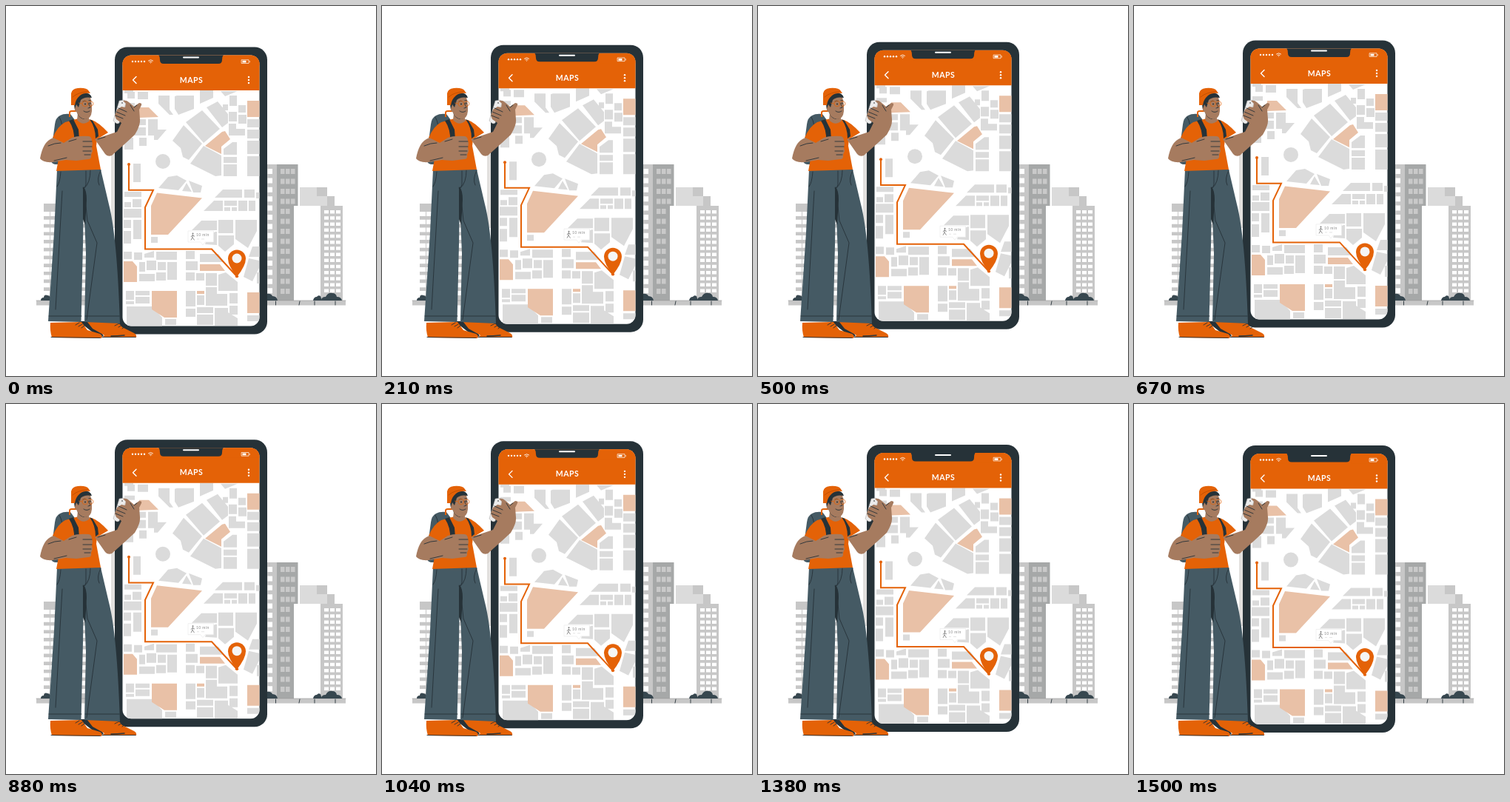
Write an HTML page that moves like this. It is 500x500 px and loops after 1.54 s.

```html
<!DOCTYPE html>
<html lang="en">
<head>
<meta charset="utf-8">
<title>Maps</title>
<style>
  html, body { margin: 0; width: 100%; height: 100%; overflow: hidden; background: #fff; }
  svg { display: block; width: 100%; height: 100%; }
  .dark { fill: #263238; }
  .slate { fill: #455a64; }
  .orange { fill: #e46207; }
  .skin { fill: #a67b5f; }
  .grey { fill: #c7c7c7; }
  .pale { fill: #dbdbdb; }
  .peach { fill: #e9c1a7; }
  .white { fill: #fff; }
  .line { fill: none; stroke: #263238; stroke-width: .9; stroke-linecap: round; stroke-linejoin: round; }
  .route { fill: none; stroke: #e46207; stroke-width: 2; }
  .icon { fill: none; stroke: #fff; stroke-width: 1.4; stroke-linecap: round; stroke-linejoin: round; }
</style>
</head>
<body>
<svg viewBox="0 0 500 500">
  <defs>
    <clipPath id="screen"><rect x="157.500" y="66.500" width="185" height="366" rx="12"/></clipPath>
  </defs>

  <g id="city">
    <path fill="#e2e0de" d="M142 200h6v100h-6z"/>
    <path class="grey" d="M51 267h66v131H51zM353 214h14v184h-14z"/>
    <path fill="#a6a8a8" d="M366 214h28.500v56H389v128h-23z"/>
    <path class="pale" d="M397 245h23v12h14v13h-37z"/>
    <path class="grey" d="M420 245h14v12h10v13h-10v-13h-14zM425 270h30v128h-30z"/>
    <g id="windows"></g>
    <path class="grey" d="M41 398h418v6.500H41z"/>
    <path class="line" d="M41 398h418" style="stroke:#999;stroke-width:.6"/>
    <path class="line" d="M84 399v5M364.500 399v5M397 399l-1 5M417 399v5M445 399v5"/>
    <path fill="#37474f" d="M47 398q0-4 4-4q1-5 5-3q5 1 5 7zM352 398v-9q6-1 8 3q6 0 7 6zM415 398q1-5 5-5q2-3 5-1l2 6z"/>
    <path fill="#37474f" d="M426 398q0-5 6-5q3-6 9-5q5 0 6 5q6 0 7 5z"/>
  </g>

  <g id="phone">
    <rect class="dark" x="147" y="55.500" width="206" height="388" rx="17"/>
    <g clip-path="url(#screen)">
      <path class="white" d="M157 66h186v367H157z"/>
      <g class="pale">
        <!-- upper left -->
        <path d="M164 116h10v9h-10zM178 116h14v10h-14zM160 114h12v4h-12zM206 121h15v19l5 7h-5l-15-15zM228 122l3-1h23v18l-21 8-5-8zM262 114h18v10l-18 8zM160 131h14v6h-14zM172 153h17v8h-17zM192 153h13v14h12l-12 14h-5v-6h-8zM174 164h15v11h-15zM180 178h10v11h-10zM160 178h12v16h-12zM172 213h10v25h-10z"/>
        <!-- centre -->
        <circle cx="212" cy="210" r="10"/>
        <path d="M240 161l25 25-18 22-8-4-3-12-11-10zM243 157l22-16 24 25-22 19zM271 137l15-8 14 17v12l-8 6zM267 189l24 13v27l-8 1-34-17zM206 246l13-15 12-2 13 7-11 13zM247 236l18 7-2 9h-10zM244 239l7 12-13-1z"/>
        <!-- upper right -->
        <path d="M290 115h23l-17 7zM302 121h10v14h-10zM293 133h7v8h-7zM301 143h11v13h-11zM314 147h11v12h-11zM301 159h10v7h12v9h-22zM314 134h10v10h-10zM326 153h17v11h-17zM326 167h17v12h-17zM326 182h17v18h-17zM306 184h6v17h-18v-8zM294 204h18v8h-18zM294 214h18v16h-18zM326 203h17v27h-17z"/>
        <!-- left edge -->
        <path d="M160 251h23v7h-23zM160 265h9v7h-9zM171 261h12v11h-12zM159 274h24v12h-24zM172 289h11v26h-11zM159 289h10v11h-10zM159 304h10v17h-10zM196 312h9v8h-9z"/>
        <!-- right middle -->
        <path d="M293 248h26v11h-37zM322 248h14v11h-14zM338 252h5v8h-5zM281 263h12v14h-26zM295 263h17v7h-17zM314 263h12v14h-12zM328 263h9v14h-9zM295 272h8v5h-8zM305 272h7v5h-7zM264 290h21v13h-34zM287 289h20v18h-20zM310 289h29v15l-12 23-17-12zM283 305h2v18l-16-1 4-12zM287 310h21v12l-12 10-9-8zM333 325h10v14h-15z"/>
        <!-- lower left -->
        <path d="M159 332h11v10h-11zM173 333h11v10h-11zM187 335l13-4v9h-13zM203 332h28v11h-28zM180 346h8v13h-8zM190 344h13v13h-13zM205 346h11v11h-11zM218 346h13v24h-13zM180 362h21v10h-21zM203 360h13v11h-13zM162 385h11v12h-11zM175 385h19v6h-19zM175 393h19v9h-19zM162 399h11v4h-11zM163 406h34l14 15v12h-48zM215 423h15v8h-15z"/>
        <!-- lower right -->
        <path d="M243 331h12v11h-12zM243 345h16v12h-16zM243 360h12v11h-12zM257 361h11v10h-11zM262 335h25l8 11h-33zM270 361h15v17h-15zM287 363l10-3 16 13v12h-26zM270 380h15v9h14v16h-29zM302 388h11v14h-11zM243 385h13v21h-13zM258 391h10v13h-10zM243 409h13v11h-13zM258 407h22v8h-22zM258 417h22v14h-22zM282 408h18v6l13 8v10h-31zM302 405h11v12h-11zM328 341l14 3v10l-9 18-12-6zM339 360h4v15h-4zM326 418h17v8h-17z"/>
      </g>
      <path class="peach" d="M180 137h13l13 13-26 1zM326 128h17v22h-17zM269 189l23-19 4-1 7 11-12 10v10zM204 252.500l61 7-46 49.500h-23v-39zM159 345h12l6 7v21h-18zM262 349h27l7 9h-34zM197 385h34v36h-17l-17-11zM326 387h17v28h-17zM258 385h10v4h-10z"/>

      <path class="route" d="M166 214v34.700h33l-11 23.300v56.500h90l34 37"/>
      <circle class="orange" cx="166" cy="214" r="2"/>
      <path d="M246 304h34.500v15H269l-3 4-3-4h-17z" fill="#fff" stroke="#e7e7e7" stroke-width=".6"/>
      <circle cx="252.500" cy="307.500" r="1" fill="#777"/>
      <path d="M252.500 309l-.5 3.500-2 4m2-4l2.500 4m-4.500-4.500l2-2.500 3 2" fill="none" stroke="#777" stroke-width=".8"/>
      <text x="257" y="311" font-family="Lato, sans-serif" font-size="5" letter-spacing=".4" fill="#888">10 min</text>
      <path d="M258 315h3m3 0h4" stroke="#ddd" stroke-width=".8"/>
      <ellipse class="orange" cx="312" cy="365.500" rx="2.200" ry="1.800"/>
      <path class="orange" d="M312 366q-12-15-12-24.500a12 12 0 0 1 24 0q0 9.500-12 24.500z"/>
      <circle cx="312" cy="341" r="6.500" fill="#f5f5f5"/>

      <path class="orange" d="M157 66h186v48H157z"/>
      <path class="dark" d="M157 65h48q3 2 3 8 0 5 5 5h74q5 0 5-5 0-6 3-8h48v-5H157z"/>
      <path class="orange" d="M157 80V78q0-11 11-11.500h35q3 1 3.500 5L207 80zM343 80V78q0-11-11-11.500h-35q-3 1-3.500 5L293 80z"/>
      <g class="white">
        <g id="signal"></g>
        <circle cx="328" cy="96" r="1.200"/><circle cx="328" cy="100" r="1.200"/><circle cx="328" cy="104" r="1.200"/>
        <path d="M319.500 73.800h5v2.700h-5z"/>
        <text x="250.500" y="103.600" text-anchor="middle" font-family="Lato, sans-serif" font-weight="700" font-size="10.500" letter-spacing=".5">MAPS</text>
      </g>
      <g class="icon">
        <path d="M176 95.500l-4.500 4.500 4.500 4.500"/>
        <path d="M192.500 74q3-2.500 6 0M194 75.600q1.500-1.200 3 0M195.500 77v.1" style="stroke-width:.9"/>
        <path d="M318.500 72.800h9.500v4.700h-9.500zM329.300 74.500v1.500" style="stroke-width:.7"/>
      </g>
    </g>
    <path class="icon" d="M240 69.500h20" style="stroke-width:2"/>
  </g>

  <g id="walker">
    <path class="slate" d="M73 148q5-3 14-2l9 12-8 56-22 0q-6-1-6-9l6-45q1-9 7-12z"/>
    <path class="line" d="M72 150q6 10 3 24M64 186l-3 22"/>
    <path d="M86 150v-6q0-2 3-2h7" fill="none" stroke="#e46207" stroke-width="2"/>

    <path class="dark" d="M98 426h22l12 20-6 2z"/>
    <path class="orange" d="M60 428q-1 10 2 20l67 1q2-4-2-6l-17-5-8-11zM110 427l7 9 16 9-3 3h46q1-4-3-6l-16-8-6-7z"/>
    <path class="line" d="M61 447.500l66 1M130 447.500h45M94 431l5-3M98 433l5-3M102 435l4-3M147 432l6-3M152 434l5-3M157 436l4-3"/>
    <path class="line" d="M142 446q8 0 18-1" style="stroke-width:1.400"/>
    <path class="slate" d="M69 221h59l11 47q11 42 15 161l-48-2 2-92-3-73-1 60-2.500 105-44.500-1 8-120z"/>
    <path class="line" d="M106 250l4 40 13 30-14 104M108 223v18q-1 5-4 5M114 222q0 17-8 24M74 224q-1 15-5 20M128 222q-6 12-2 20M76 250l-9 160M58 419h44M107 419h46"/>
    <path class="dark" d="M104 244q5 4 5 18l-2 34-3-8z"/>

    <path class="orange" d="M80 157l18-5 18 2q9 3 22 17l-15 9-1 9 6 32-60 2 7-38-12-7q7-16 17-21z"/>
    <path class="skin" d="M97 145l-1 9q8 9 17 1l-3-10z"/>
    <path class="dark" d="M96 144l15 7q-2 2-6 2-7-2-9-9z"/>
    <path class="skin" d="M93 123h21l2 10v9q-1 11-9 11-8-1-11-9-5-3-3-10z"/>
    <path class="dark" d="M91 127q4-10 14-10 9 0 11 7-10-2-15 3l-3 10-3-4-2 6z"/>
    <path class="orange" d="M88 134v-16q1-6 9-7 12-1 15 4l2 3q-9-1-14 3-6 5-7 13z"/>
    <path class="line" d="M90 123q8-7 21-7" style="stroke:#c04f00"/>
    <path class="line" d="M104 129q2-1.500 4-.5M112 127.500l3 .5M111 131l3 6-3 1M105 142q4 3 8 0"/>
    <circle class="dark" cx="107" cy="132.500" r="1"/><circle class="dark" cx="113.500" cy="131.500" r="1"/>
    <path d="M103 132a3.800 3.800 0 1 0 7.600 0a3.800 3.800 0 1 0-7.600 0M111.500 130a3.500 3.500 0 1 1 1 5M103 132l-5-1" fill="none" stroke="#e46207" stroke-width=".7"/>
    <path class="dark" d="M85 155l6-2 7 14 1 14-7 1q1-15-7-27zM113 153l4 2 7 12 1 9-4 3q0-15-8-26z"/>

    <path class="skin" d="M64 178l14 7 11-7q8-3 23-2 4 1 4 6l1 4-1 5 1 5-2 5q1 6-4 6l-16 2-14-1-18 3q-13 1-17-5 2-11 6-18 4-7 12-10z"/>
    <path class="line" d="M57 189q9-4 17-4M65 209l17-4M104 183h12M104 190h12M104 196h11M106 201h8M85 183l10-3"/>
    <path fill="#ececec" stroke="#999" stroke-width=".5" d="M153 128l6-1 4 2-10 29q-2 2-5 0l-3-3z"/>
    <path class="skin" d="M120 180l18-6 12-4 6-12-7-5-2-5 3-8 6-4 5 1 1-5-4-4q5-1 8 2l7 6 7-5q4 0 3 3l-3 6 1 13q1 8-7 21-15 14-31 28-6 2-9-2z"/>
    <path class="line" d="M148 148l10 4M149 143l12 5M152 138l11 5M124 180l10-3M168 134l5 8M177 134l-4 3"/>
    <circle cx="157" cy="131" r="1" fill="#777"/>
  </g>
</svg>
<script>
  const byId = id => document.getElementById(id);

  // Grid of equal panes as path data.
  const panes = (xs, y, rows, pitch, w, h) =>
    Array.from({ length: rows }, (_, r) =>
      xs.map(x => `M${x} ${y + r * pitch}h${w}v${h}h${-w}z`).join("")).join("");
  const pane = (fill, ...grid) => `<path fill="${fill}" d="${panes(...grid)}"/>`;

  byId("windows").innerHTML =
    pane("#fff", [50, 60, 102], 278, 11, 10.7, 9, 6) +
    pane("#fff", [353.5], 220, 14, 12.4, 6.5, 7) +
    pane("#c9c9c9", [371, 378, 385], 220, 4, 13.5, 5.5, 7) +
    pane("#c9c9c9", [371, 378], 274, 9, 13.5, 5.5, 7) +
    pane("#fff", [430, 438, 446], 276, 14, 8.2, 6, 4.5);

  byId("signal").innerHTML = [171, 175, 179, 183, 187]
    .map(x => `<circle cx="${x}" cy="75" r="1.2"/>`).join("");

  const LOOP = 1540, HALF = LOOP / 2, LEAD = 60, phone = byId("phone");
  const start = performance.now();

  // The phone drifts up and back down at constant speed.
  function draw(now) {
    const phase = ((Math.max(0, now - start) + LEAD) % LOOP) / HALF;
    const lift = phase < 1 ? phase : 2 - phase;
    phone.setAttribute("transform", `translate(0 ${(0.8 - 10.4 * lift).toFixed(2)})`);
    requestAnimationFrame(draw);
  }
  draw(start);
</script>
</body>
</html>
```
